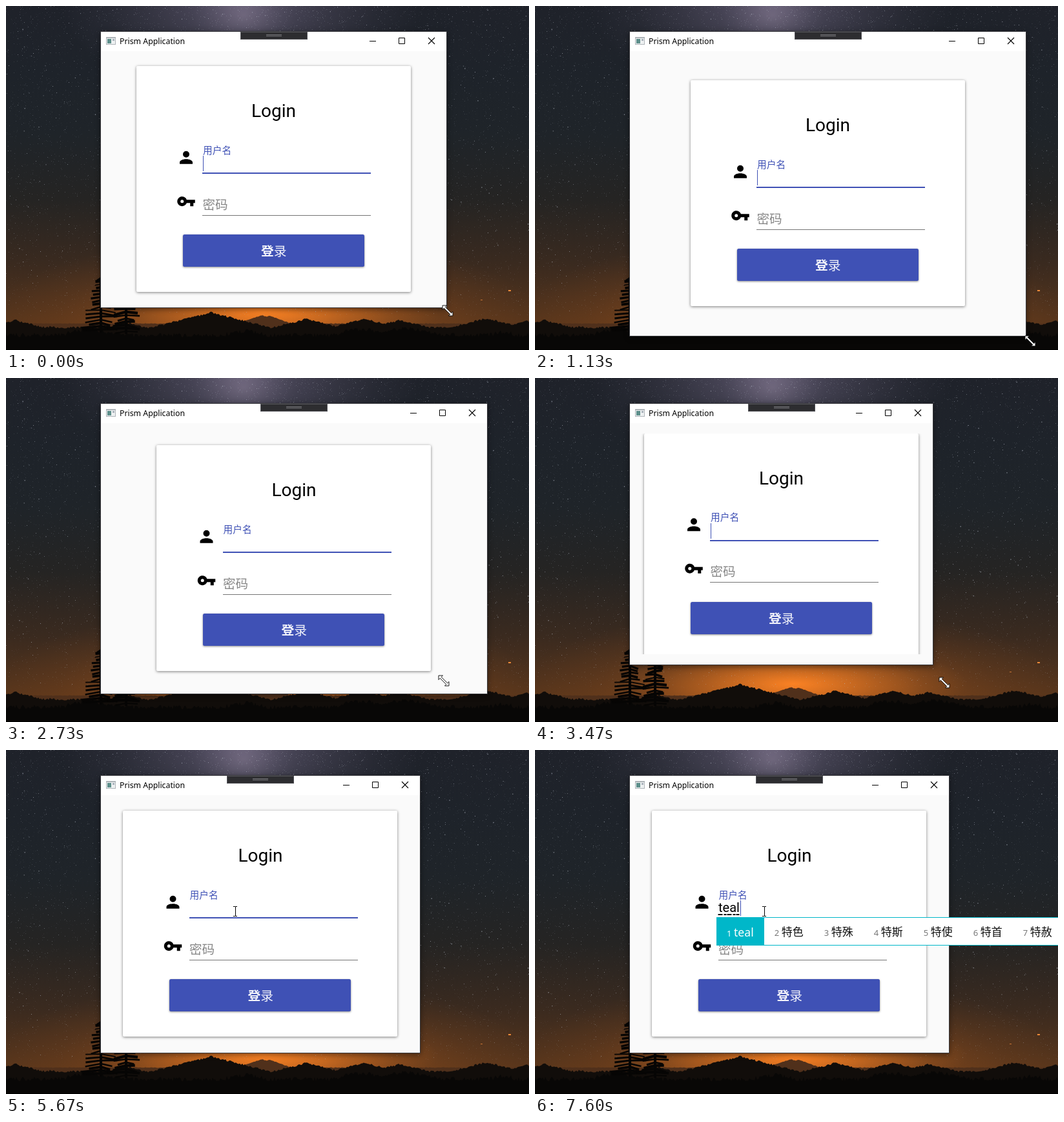
An HTML page with a canvas that plays this animation: 810 px wide and 533 px high, repeating every 8 s.

```html
<!DOCTYPE html>
<html lang="zh-CN">
<head>
<meta charset="utf-8">
<title>Login</title>
<style>
html, body { margin: 0; width: 100%; height: 100%; overflow: hidden; background: #0b0d10; }
#stage { position: relative; width: 810px; height: 533px; overflow: hidden; }
canvas, svg { position: absolute; left: 0; top: 0; display: block; }
text { white-space: pre; }
.cjk { font-family: 'Noto Sans CJK SC', 'Noto Sans CJK', sans-serif; font-weight: 300; }
.latin { font-family: Roboto, sans-serif; }
.crisp { shape-rendering: crispEdges; }
#frame { filter: drop-shadow(0 2px 4px rgba(0,0,0,.45)); }
#card { filter: drop-shadow(0 1px 2.2px rgba(0,0,0,.5)); }
#button { filter: drop-shadow(0 1px 1.5px rgba(0,0,0,.45)); }
#ime {
  position: absolute; left: 281px; top: 259px; height: 44px; box-sizing: border-box;
  display: flex; background: #fff; border: solid #00b7c9; border-width: 1px 0;
  font: 17px/44px 'Noto Sans', 'Noto Sans CJK SC', 'Noto Sans CJK', sans-serif; color: #111; white-space: nowrap;
}
#ime span { padding: 0 16px; height: 42px; }
#ime i { display: inline-block; width: 11px; font-style: normal; font-size: 13px; color: #777; }
#ime span:first-child { background: #00b7c9; color: #fff; font-size: 17.6px; }
#ime span:first-child i { color: #fff; }
</style>
</head>
<body>
<div id="stage">
  <canvas id="sky" width="810" height="533"></canvas>

  <svg width="810" height="533" viewBox="0 0 810 533">
    <clipPath id="clip"><rect id="clipBox" y="86" width="810"/></clipPath>
    <g id="frame">
      <rect id="edge" x="146.5" y="39.5" fill="none" stroke="#3a3a3e"/>
      <rect id="body" x="147" y="40" fill="#fafafa"/>
    </g>
    <rect id="bar" x="147" y="40" height="30" fill="#fff"/>
    <g class="crisp">
      <rect x="155" y="48" width="15" height="12" fill="#aeb4b8"/>
      <rect x="156" y="50" width="13" height="9" fill="#eef1f2"/>
      <rect x="157" y="51" width="6" height="7" fill="#5d8f8b"/>
      <rect x="165" y="51" width="3" height="3" fill="#a9b3bb"/>
    </g>
    <text x="176" y="59" font-size="12.3" font-family="'Noto Sans', sans-serif">Prism Application</text>
    <g id="controls" fill="none" stroke="#000">
      <path d="M-119 54.5h10M-73.5 49.5h9v9h-9z"/>
      <path d="M-28 49l10 10M-18 49l-10 10" stroke-width="1.1"/>
    </g>
    <g id="tools">
      <rect x=".5" y="40.5" width="103" height="11" fill="#2d2d30" stroke="#55555a"/>
      <path d="M40 44.5h24M40 46.5h24" stroke="#77777b"/>
    </g>

    <g id="view">
      <g id="panel">
        <rect id="card" width="425" height="350" rx="2" fill="#fff"/>
        <rect id="button" x="72" y="261" width="281" height="50" rx="2.5" fill="#3f51b5"/>
      </g>
      <g id="form">
        <text class="latin" x="212.5" y="78.6" font-size="28" text-anchor="middle">Login</text>
        <path transform="translate(62 126.2) scale(1.25)" d="M12 4a4 4 0 0 1 0 8a4 4 0 0 1 0-8M12 14c4.42 0 8 1.79 8 4v2H4v-2c0-2.21 3.58-4 8-4z"/>
        <path transform="translate(62 194.2) scale(1.25)" fill-rule="evenodd" d="M7 14a2 2 0 0 1 0-4a2 2 0 0 1 0 4M12.65 10A6 6 0 1 0 12.65 14H17v4h4v-4h2v-4z"/>
        <text class="cjk" x="103" y="135.4" font-size="14.7" fill="#3f51b5">用户名</text>
        <rect class="crisp" x="102.1" y="164.6" width="261" height="2" fill="#3f51b5"/>
        <text class="cjk" x="102.5" y="221" font-size="19.6" fill="#888">密码</text>
        <rect class="crisp" x="102.1" y="230.4" width="261" height="1" fill="#757575"/>
        <text class="cjk" x="193" y="293.6" font-size="19.8" fill="#f1f2fa"><tspan font-weight="700">登</tspan>录</text>
        <text id="typed" class="latin" x="102.5" y="156.6" font-size="20"></text>
        <path id="marks" stroke="#111" stroke-width="2" stroke-dasharray="7 2 4 1"/>
        <rect id="caret" class="crisp" y="138.6" width="1" height="24" fill="#3f51b5"/>
      </g>
    </g>
  </svg>

  <div id="ime"></div>

  <svg width="810" height="533" viewBox="0 0 810 533">
    <g id="cursor">
      <path id="resize" d="M-8-8h6.500l-2.300 2.300 9.500 9.500 2.300-2.300v6.500h-6.500l2.300-2.300-9.500-9.500-2.300 2.300z" fill="#fff" stroke="#000" stroke-width=".9"/>
      <path id="arrow" d="M0 0v16.500l3.800-3.700 2.500 5.700 2.500-1-2.500-5.600h5.200z" fill="#fff" stroke="#000"/>
      <path id="beam" d="M-3 -7.500h2.500l.5.5.5-.5h2.500M-3 7.500h2.500l.5-.5.5.5h2.500M.5-7v14" fill="none" stroke="#000"/>
    </g>
  </svg>
</div>

<script>
const $ = id => document.getElementById(id);
const LOOP = 8000, FPS = 15, BLINK = 9;
const HANDOFF = 72, CLICK = 81;

// Dragged window corner: step, x, y
const drag = [[1, 682, 467], [9, 745, 503], [27, 779, 521], [35, 779, 521], [41, 745, 489],
  [46, 606, 438], [49, 606, 438], [52, 616, 444], [56, 641, 481], [59, 641, 469]];
const typing = [[102, 't'], [107, 'te'], [109, 'tea'], [113, 'teal']];
const lists = [[103, '他 她 它 天 听 太 条'], [107, '特 特别 特点 特色 特殊 特意'],
  [109, '特色 特殊 特斯 特使 特首 特赦 特设'], [114, 'teal 特色 特殊 特斯 特使 特首 特赦']];
const caretResets = [-7, 52, 76, 102, 111];

const mix = (a, b, f) => a + (b - a) * f;
const latest = (list, s) => list.reduce((v, [k, x]) => k <= s ? x : v, '');
const set = (id, attrs) => { for (const k in attrs) $(id).setAttribute(k, attrs[k]); };
const move = (id, x, y) => set(id, { transform: `translate(${x} ${y})` });
const show = (id, on) => { $(id).style.display = on ? '' : 'none'; };

function corner(s) {
  const i = drag.findIndex(k => k[0] > s);
  if (i === 0) return drag[0].slice(1);
  if (i < 0) return drag[drag.length - 1].slice(1);
  const [a, b] = [drag[i - 1], drag[i]], f = (s - a[0]) / (b[0] - a[0]);
  return [1, 2].map(j => Math.round(mix(a[j], b[j], f)));
}

// While dragging, the window trails the pointer by 2.5 steps.
function pointer(s) {
  const [x, y] = corner(s > 1 ? s + 2.5 : s);
  const t = Math.min(1, Math.max(0, (s - HANDOFF) / (CLICK - HANDOFF))), f = t * t * (3 - 2 * t);
  return [mix(x + 2, 355, f), mix(y + 5, 250, f)].map(Math.round);
}

function drawWindow(s) {
  const [r, b] = corner(s), mid = (r + 147) / 2;
  const x = mid - 212.5, y = Math.max(86, (b - 280) / 2);
  set('edge', { width: r - 146, height: b - 39 });
  set('body', { width: r - 147, height: b - 40 });
  set('bar', { width: r - 147 });
  set('clipBox', { height: b - 102 });
  set('view', { 'clip-path': b < 452 ? 'url(#clip)' : 'none' });
  move('controls', r, 0);
  move('tools', Math.round(mid - 52), 0);
  move('panel', Math.floor(x), Math.floor(y));
  move('form', x, y);
}

function drawInput(s) {
  const word = latest(typing, s), words = latest(lists, s);
  $('typed').textContent = word;
  const w = word ? Math.round($('typed').getComputedTextLength()) : 0;
  set('marks', { d: `M102 160.500h${w}` });
  set('caret', { x: 103.1 + w });
  show('marks', word);
  const reset = Math.max(...caretResets.filter(k => k <= s));
  show('caret', Math.floor((s - reset) / BLINK) % 2 === 0);
  show('ime', words);
  $('ime').innerHTML = words && words.split(' ').map((c, i) => `<span><i>${i + 1}</i>${c}</span>`).join('');
}

function drawPointer(s) {
  const [x, y] = pointer(s), overText = y < 260;
  move('cursor', x, y);
  show('resize', s <= HANDOFF);
  show('arrow', s > HANDOFF && !overText);
  show('beam', s > HANDOFF && overText);
}

function paintSky() {
  const c = $('sky').getContext('2d');
  let seed = 11;
  const rnd = () => (seed = seed * 16807 % 2147483647) / 2147483647;
  const rect = (fill, x, y, w, h) => { c.fillStyle = fill; c.fillRect(x, y, w, h); };
  const glow = (x, y, rx, ry, rgb, alpha) => {
    c.save();
    c.translate(x, y);
    c.scale(rx, ry);
    const g = c.createRadialGradient(0, 0, 0, 0, 0, 1);
    for (let k = 0; k <= 1; k += .25) g.addColorStop(k, `rgba(${rgb},${alpha * (1 - k) ** 1.4})`);
    rect(g, -1, -1, 2, 2);
    c.restore();
  };

  const base = c.createLinearGradient(0, 0, 0, 500);
  ['#1f222a', '#1e232a', '#1f2429', '#252423', '#3a2a1f', '#5a361b'].forEach((k, i) => base.addColorStop(i / 5, k));
  rect(base, 0, 0, 810, 533);
  glow(365, -5, 280, 150, '112,103,130', .75);
  glow(368, 15, 80, 60, '165,150,175', .35);
  glow(400, 486, 430, 130, '200,100,28', .65);
  glow(400, 474, 270, 62, '255,132,36', .95);

  // Star dust, denser and brighter along the band at the top
  for (let i = 0; i < 9000; i++) {
    const x = rnd() * 810 | 0, y = 480 * rnd() ** 1.2 | 0;
    const band = Math.exp(-(((x - 365) / 150) ** 2) - (y / 90) ** 2);
    rect(`rgba(185,190,202,${.04 + .16 * rnd() ** 2 + .5 * rnd() ** 14 + .15 * band * rnd()})`, x, y, 1, 1);
  }
  for (let i = 0; i < 130; i++) rect(`rgba(205,212,225,${.25 + rnd() * .4})`, rnd() * 810, rnd() * 400, 1.3, 1.3);
  rect('#f08a38', 778, 440, 4, 2);
  rect('#c87434', 735, 455, 3, 1);

  // Skyline: the highest of several sloping peaks, with rough edges
  const ridge = (fill, foot, slope, rough, peaks) => {
    c.fillStyle = fill;
    c.beginPath();
    c.moveTo(0, 533);
    for (let x = 0; x <= 812; x += 2)
      c.lineTo(x, Math.min(foot, ...peaks.map(([px, top]) => top + slope * Math.abs(x - px))) + (rnd() - .5) * rough);
    c.lineTo(812, 533);
    c.fill();
  };
  ridge('#50301b', 492, .35, 1, [[396, 479], [408, 480]]);
  ridge('#110d0a', 498, .25, 3, [[15, 487], [70, 496], [185, 490], [318, 475], [465, 485], [555, 485], [610, 487], [744, 484], [806, 488]]);
  ridge('#080706', 510, .2, 7, [[130, 500], [370, 503], [550, 500], [620, 498], [770, 505]]);

  const tree = (x, top, foot, w) => {
    c.strokeStyle = '#060504';
    for (let y = top; y < foot; y += 5) {
      const half = w * (.25 + .75 * (y - top) / (foot - top)) * (.6 + rnd() * .6);
      c.lineWidth = 1.5 + rnd() * 3;
      c.beginPath();
      c.moveTo(x - half, y + 5 - rnd() * 5);
      c.lineTo(x, y);
      c.lineTo(x + half * (.7 + rnd() * .4), y + 5 - rnd() * 6);
      c.stroke();
    }
    rect('#060504', x - 2, top, 4, foot - top);
  };
  tree(147, 421, 506, 29);
  tree(186, 434, 508, 28);
  rect('#000', 0, 532, 810, 1);
}

let shown = -1;
function tick(now) {
  const s = Math.floor((now % LOOP + 4) * FPS / 1000);
  if (s !== shown) {
    shown = s;
    drawWindow(s);
    drawInput(s);
    drawPointer(s);
  }
  requestAnimationFrame(() => tick(performance.now() - start));
}

paintSky();
const start = performance.now();
tick(0);
</script>
</body>
</html>
```
